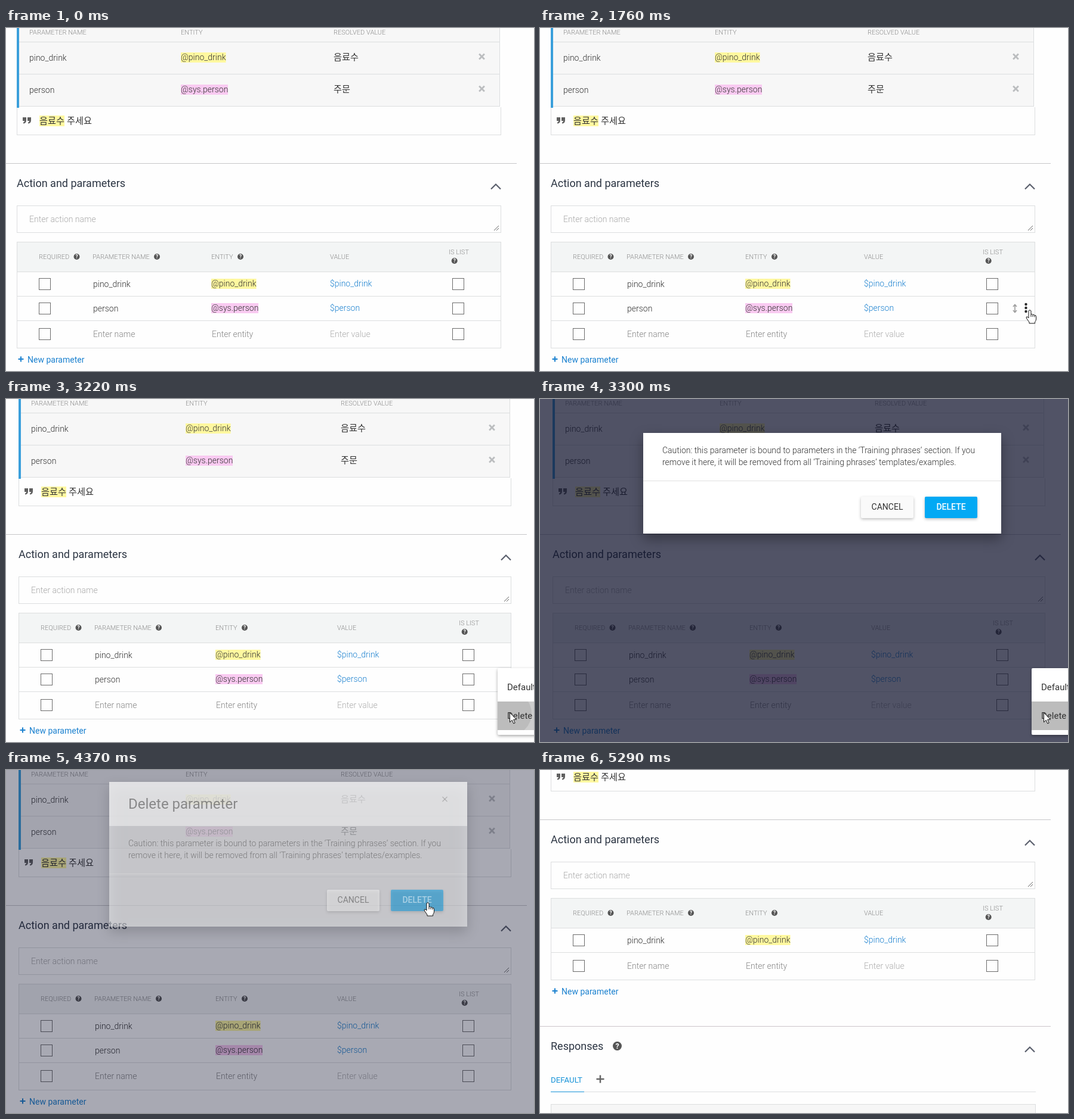
Write an HTML page with a canvas that moves like this. It is 885 by 576 pixels and loops after 5.95 s.

```html
<!DOCTYPE html>
<html lang="en">
<head>
<meta charset="utf-8">
<title>Delete parameter</title>
<style>
  html, body { margin: 0; width: 100%; height: 100%; overflow: hidden; background: #fff; }
  canvas { display: block; width: 885px; height: 576px; }
</style>
</head>
<body>
<canvas id="stage" width="885" height="576"></canvas>
<script>
const W = 885, H = 576, LOOP = 5950, STEP = 76.7, LEAD = 14;
const FONT = 'Roboto, "Noto Sans CJK KR", "Noto Sans CJK JP", "Noto Sans CJK", sans-serif';
const ctx = document.getElementById('stage').getContext('2d');

const INK = '#333', HEAD = '#8b8b8b', BLUE = '#1b81cf', LINE = '#dcdedf';
const YELLOW = '#fff89f', PINK = '#f9caf1';

// Steps at which the screen changes abruptly
const AT = { menu: 26, press: 41, dialog: 43, title: 44, confirm: 57, back: 58, removed: 60 };

// Column positions without and with the page scrollbar hidden
const NARROW = { dx: 0, right: 830, rule: 856, ent1: 293, res: 549, ent: 344, val: 543, list: 742 };
const WIDE = { dx: 3, right: 847, rule: 873, ent1: 301, res: 561, ent: 351, val: 555, list: 759 };

// Pointer keys: step, x, y, shape
const NONE = 0, ARROW = 1, HAND = 2;
const POINTER = [
  [0, 0, 0, NONE], [1, 876, 526, ARROW], [2, 0, 0, NONE], [5, 869, 421, HAND], [6, 0, 0, NONE],
  [8, 864, 534, ARROW], [12, 835, 400, ARROW], [15, 808, 391, ARROW], [18, 754, 392, ARROW],
  [20, 775, 470, ARROW], [21, 785, 510, ARROW], [23, 821, 473, HAND], [24, 820, 477, ARROW],
  [34, 820, 477, ARROW], [36, 844, 528, ARROW], [37, 844, 528, ARROW], [38, 837, 530, ARROW],
  [39, 844, 526, ARROW], [43, 844, 526, ARROW], [48, 777, 418, ARROW], [49, 743, 369, ARROW],
  [51, 709, 285, ARROW], [54, 706, 226, HAND], [56, 707, 222, HAND], [58, 707, 222, HAND],
  [60, 705, 233, ARROW], [64, 705, 233, ARROW], [68, 859, 294, ARROW], [69, 0, 0, NONE]
];

const clamp = v => Math.max(0, Math.min(1, v));
const easeOut = v => 1 - (1 - clamp(v)) ** 3;

function rect(x, y, w, h, color) {
  ctx.fillStyle = color;
  ctx.fillRect(x, y, w, h);
}

function frame(x, y, w, h, color) {
  ctx.strokeStyle = color;
  ctx.lineWidth = 1;
  ctx.strokeRect(x + .5, y + .5, w - 1, h - 1);
}

function text(str, x, y, color = INK, size = 14, weight = 300, align = 'left') {
  ctx.font = `${weight} ${size}px ${FONT}`;
  ctx.textAlign = align;
  ctx.fillStyle = color;
  ctx.fillText(str, x, y);
}

function stroke(points, color, width) {
  ctx.beginPath();
  points.forEach(([x, y]) => ctx.lineTo(x, y));
  ctx.strokeStyle = color;
  ctx.lineWidth = width;
  ctx.stroke();
}

function disc(x, y, r, color) {
  ctx.beginPath();
  ctx.arc(x, y, r, 0, 7);
  ctx.fillStyle = color;
  ctx.fill();
}

function shadow(color, blur, y) {
  ctx.shadowColor = color;
  ctx.shadowBlur = blur;
  ctx.shadowOffsetY = y;
}

function box(x, y, w, h, r, color) {
  ctx.beginPath();
  ctx.roundRect(x, y, w, h, r);
  ctx.fillStyle = color;
  ctx.fill();
}

function cross(x, y, r, color, width) {
  stroke([[x - r, y - r], [x + r, y + r]], color, width);
  stroke([[x - r, y + r], [x + r, y - r]], color, width);
}

function plus(x, y, r, color, width) {
  stroke([[x - r, y], [x + r, y]], color, width);
  stroke([[x, y - r], [x, y + r]], color, width);
}

function help(x, y, r = 5) {
  disc(x, y, r, '#555');
  text('?', x, y + r * .6, '#fff', r * 1.65, 700, 'center');
}

function chevron(x, y) {
  stroke([[x - 8, y + 4.5], [x, y - 3.5], [x + 8, y + 4.5]], '#5a5f6c', 2.2);
}

function tag(str, x, y, w, color) {
  rect(x, y - 13, w, 17, color);
  text(str, x, y);
}

function quotes(x, y) {
  ctx.fillStyle = '#606060';
  for (const dx of [0, 8]) {
    ctx.fill(new Path2D(`M${x + dx} ${y}h6v5q0 5 -5 5.5v-2q2 -.5 2 -2.5h-3z`));
  }
}

function phrases(c) {
  const x = c.dx, edge = c.right - 2;
  rect(22 + x, 0, edge - 22 - x, 132, '#f7f7f7');
  for (const y of [23, 77, 131]) rect(22 + x, y, edge - 22 - x, 1, LINE);
  rect(edge - 1, 0, 1, 132, LINE);
  rect(18 + x, 0, 4, 134, '#3a9fdb');
  text('PARAMETER NAME', 39 + x, 11, HEAD, 11);
  text('ENTITY', c.ent1, 11, HEAD, 11);
  text('RESOLVED VALUE', c.res, 11, HEAD, 11);
  text('pino_drink', 39 + x, 55);
  text('person', 39 + x, 109);
  tag('@pino_drink', c.ent1, 54, 75.6, YELLOW);
  tag('@sys.person', c.ent1, 108, 79, PINK);
  text('음료수', c.res, 53.5, INK, 15.2);
  text('주문', c.res, 107.5, INK, 15.2);
  for (const y of [48, 102]) cross(c.right - 32.5, y, 4.4, '#bbbdbf', 2.8);

  rect(18 + x, 134, 1, 46, LINE);
  rect(c.right - 1, 133, 1, 47, LINE);
  rect(18 + x, 179, c.right - 18 - x, 1, LINE);
  quotes(28 + x, 150);
  rect(56 + x, 147, 42, 18, YELLOW);
  text('음료수', 56 + x, 160.5, INK, 15.2);
  text('주세요', 102 + x, 160.5, INK, 15.2);
}

function checks(c, y) {
  frame(55 + c.dx, y - 10, 20, 20, '#6c6c6c');
  frame(c.list + 6, y - 10, 20, 20, '#6c6c6c');
}

function rowTools(y, active) {
  const grey = '#9a9a9a';
  stroke([[796, y - 5], [796, y + 5]], grey, 1.6);
  stroke([[793, y - 3], [796, y - 6.5], [799, y - 3]], grey, 1.6);
  stroke([[793, y + 3], [796, y + 6.5], [799, y + 3]], grey, 1.6);
  for (const d of [-6, 0, 6]) disc(814.5, y + d - 1, 2.2, active ? '#2b2b2b' : '#777');
}

function parameters(c, removed, hover, active) {
  const x = c.dx, left = 18 + x, width = c.right - left, cut = removed ? 41 : 0;
  rect(0, 227, c.rule, 1, '#c6c6c9');
  text('Action and parameters', left, 267, '#2c3543', 18, 400);
  chevron(c.right - 9, 266);
  frame(left, 298, width, 46, LINE);
  text('Enter action name', 39 + x, 326, '#a9a9a9');
  const cx = c.right - 4, cy = 340;
  stroke([[cx - 8, cy], [cx, cy - 8]], '#666', 1);
  stroke([[cx - 4, cy], [cx, cy - 4]], '#666', 1);

  rect(left, 359, width, 50, '#f3f5f5');
  frame(left, 359, width, 179 - cut, LINE);
  text('REQUIRED', 55 + x, 388, HEAD, 11);
  help(118.5 + x, 384);
  text('PARAMETER NAME', 145 + x, 388, HEAD, 11);
  help(253 + x, 384);
  text('ENTITY', c.ent, 388, HEAD, 11);
  help(c.ent + 49, 384);
  text('VALUE', c.val, 388, HEAD, 11);
  text('IS LIST', c.list, 380, HEAD, 11);
  help(c.list + 9.7, 391);

  const rows = [['pino_drink', 75.6, YELLOW, '@'], ['person', 79, PINK, '@sys.']];
  rows.slice(0, removed ? 1 : 2).forEach(([name, w, color, prefix], i) => {
    const y = 430 + i * 41;
    rect(left, y - 21, width, 1, LINE);
    checks(c, y);
    text(name, 146 + x, y + 5);
    tag(prefix + name, c.ent, y + 4, w, color);
    text('$' + name, c.val, y + 4, BLUE);
    if (hover === i) rowTools(y, active);
  });

  const y = 514 - cut;
  rect(left, y - 23, width, 1, LINE);
  checks(c, y);
  text('Enter name', 146 + x, y + 5, '#858585');
  text('Enter entity', c.ent + 1, y + 5, '#858585');
  text('Enter value', c.val, y + 5, '#adadad');
  plus(25 + x, 556 - cut, 4.5, BLUE, 2);
  text('New parameter', 36 + x, 562 - cut, BLUE, 14, 400);
  responses(c, 615 - cut);
}

function responses(c, y) {
  rect(0, y, c.rule, 1, '#cbc5ca');
  text('Responses', 18 + c.dx, y + 40, '#2c3543', 18, 400);
  help(129.5, y + 33.5, 7.5);
  chevron(c.right - 9, y + 39);
  text('DEFAULT', 18, y + 95, '#1793d8', 13.3, 400);
  plus(101, y + 89, 6.5, '#666', 2.5);
  rect(18, y + 110, 813, 1, LINE);
  rect(18, y + 110, 56, 1, '#1793d8');
  rect(18, y + 131, 813, 60, '#f6f6f6');
  frame(18, y + 131, 813, 60, LINE);
}

function menu(k) {
  if (k < AT.menu || k > AT.title) return;
  const grow = easeOut((k - AT.menu + 1) / 5);
  ctx.save();
  ctx.globalAlpha = k === AT.title ? .4 : grow;
  ctx.translate(824, 452);
  ctx.scale(grow, grow);
  shadow('rgba(0,0,0,.34)', 5, 2);
  box(0, 0, 168, 112, 2, '#fff');
  shadow('transparent', 0, 0);
  if (k >= AT.press) {
    ctx.save();
    ctx.beginPath();
    ctx.rect(0, 56, 168, 48);
    ctx.clip();
    rect(0, 56, 168, 48, '#cdcdcd');
    disc(20, 76, [16, 37, 200, 200][k - AT.press], '#bcbcbc');
    ctx.restore();
  }
  text('Default value', 16, 37, INK, 15, 400);
  text('Delete', 16, 85, INK, 15, 400);
  ctx.restore();
}

function button(label, x, y, fill, color, weight) {
  shadow('rgba(0,0,0,.26)', 5, 2);
  box(x, y, 88, 36, 2, fill);
  shadow('transparent', 0, 0);
  text(label, x + 44, y + 22, color, 14, weight, 'center');
}

function dialog(k, hot) {
  if (k < AT.dialog || k >= AT.back) return;
  const titled = k >= AT.title, fading = k === AT.confirm;
  const top = titled ? 20 : 57, y = titled ? 94 : 57;
  ctx.save();
  if (fading) ctx.globalAlpha = .5;
  shadow('rgba(0,0,0,.34)', 20, 9);
  rect(173, top, 600, y + 169 - top, '#fff');
  shadow('transparent', 0, 0);
  if (titled) {
    rect(173, 20, 600, 74, '#f7f7f7');
    text('Delete parameter', 205, 65, INK, 24, 400);
    cross(735.5, 49, 4, '#8a8a8a', 1.3);
  }
  text('Caution: this parameter is bound to parameters in the ‘Training phrases’ section. If you', 205, y + 34);
  text('remove it here, it will be removed from all ‘Training phrases’ templates/examples.', 205, y + 54);
  rect(173, y + 80, 600, 1, '#e0e0e0');
  button('CANCEL', 538, y + 107, '#fafafa', INK, 400);
  button('DELETE', 645, y + 107, hot ? '#039be5' : '#03a9f4', '#fff', 500);
  ctx.restore();
}

function pointerAt(k) {
  let i = POINTER.length - 1;
  while (POINTER[i][0] > k) i--;
  const [k0, x0, y0, shape] = POINTER[i];
  const [k1, x1, y1] = POINTER[i + 1] || [k0 + 1, x0, y0];
  const f = (k - k0) / (k1 - k0);
  return { x: Math.round(x0 + (x1 - x0) * f), y: Math.round(y0 + (y1 - y0) * f), shape };
}

const ARROW_PATH = new Path2D('M.5 .8V16.8L4.2 13.2L6.8 19L9.2 18L6.7 12.3H11.6Z');
const HAND_PATH = new Path2D('M-2 2Q0 -1 2 2V8Q4.2 6.4 5 8.6Q7.4 7.4 8 9.7Q10.6 9 10.6 11.6V16' +
  'Q10.2 19 8.6 20.5V23H-1V21L-5.8 14Q-6.4 11.3 -4 12L-2 14Z');
const KNUCKLES = new Path2D('M2 8V12M5 8.6V12M8 9.7V12.5');

function drawPointer({ x, y, shape }) {
  if (shape === NONE) return;
  const path = shape === HAND ? HAND_PATH : ARROW_PATH;
  ctx.save();
  ctx.translate(x, y);
  ctx.fillStyle = '#fff';
  ctx.strokeStyle = '#111';
  ctx.lineWidth = 1;
  ctx.fill(path);
  ctx.stroke(path);
  if (shape === HAND) ctx.stroke(KNUCKLES);
  ctx.restore();
}

function hoveredRow(k, p) {
  if (k >= AT.menu || p.shape === NONE || p.x > 830 || p.y < 410 || p.y > 491) return -1;
  return p.y < 450 ? 0 : 1;
}

function draw(t) {
  const k = Math.floor((t + LEAD) / STEP);
  const p = pointerAt(k);
  const cols = k >= AT.menu && k < AT.back ? WIDE : NARROW;
  const scroll = 144 * clamp((k - AT.removed + 1) / 3);

  rect(0, 0, W, H, '#fefefe');
  ctx.save();
  ctx.translate(0, -scroll);
  phrases(cols);
  parameters(cols, k >= AT.removed, hoveredRow(k, p), p.shape === HAND);
  ctx.restore();

  if (k >= AT.dialog && k < AT.back) {
    rect(0, 0, W, H, `rgba(16,19,45,${k === AT.confirm ? .36 : .72})`);
  }
  menu(k);
  dialog(k, p.shape === HAND);
  drawPointer(p);
}

function tick(now) {
  draw(now % LOOP);
  requestAnimationFrame(tick);
}
requestAnimationFrame(tick);
</script>
</body>
</html>
```
